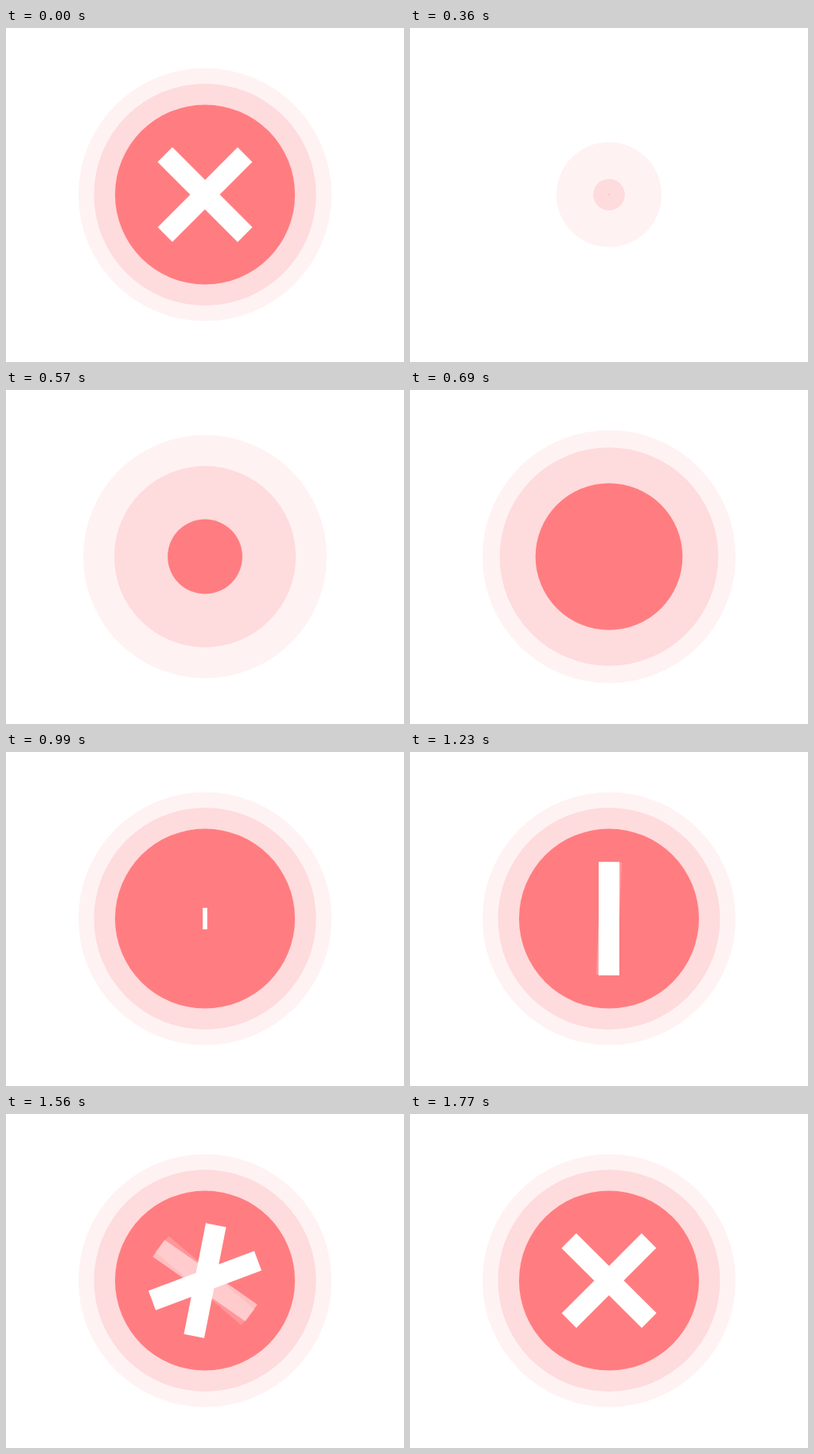
These frames come from a looping animation (500 by 420 pixels, 2250 ms). An HTML page:

```html
<!DOCTYPE html>
<html lang="en">
<head>
<meta charset="utf-8">
<title>Error mark</title>
<style>
  html, body { margin: 0; width: 100%; height: 100%; overflow: hidden; background: #fff; }
  svg { display: block; width: 500px; height: 420px; }
</style>
</head>
<body>
<svg viewBox="0 0 500 420">
  <g id="mark" transform="translate(250 209.5)"></g>
</svg>
<script>
const LOOP = 2250, STEP = 30, REST = 120;
const BAR_W = 26, BAR_H = 142;
const GROW = { start: 904, time: 270 };

const circles = [
  { r: 159, fill: '#fff2f2', start: 118 },
  { r: 139.5, fill: '#fedbdd', start: 208 },
  { r: 113, fill: '#ff7d80', start: 328 }
];
const CIRCLE_TIME = 541;

// Two faint bars run ahead of the solid ones.
const bars = [
  { turn: 135, opacity: 0.2, start: 1180 },
  { turn: 135, opacity: 0.5, start: 1211 },
  { turn: 225, opacity: 1, start: 1247 },
  { turn: 135, opacity: 1, start: 1337 }
];
const TURN_TIME = 450;

const mark = document.getElementById('mark');

function add(name, attrs) {
  const el = document.createElementNS('http://www.w3.org/2000/svg', name);
  for (const key in attrs) el.setAttribute(key, attrs[key]);
  return mark.appendChild(el);
}

for (const c of circles) c.el = add('circle', { fill: c.fill });
for (const b of bars) {
  b.el = add('rect', {
    x: -BAR_W / 2, y: -BAR_H / 2, width: BAR_W, height: BAR_H,
    fill: '#fff', 'fill-opacity': b.opacity
  });
}

// cubic-bezier(.5, 0, .47, 1)
function ease(x) {
  if (x <= 0) return 0;
  if (x >= 1) return 1;
  let lo = 0, hi = 1;
  for (let i = 0; i < 24; i++) {
    const s = (lo + hi) / 2, q = 1 - s;
    if (1.5 * s * q * q + 1.41 * s * s * q + s * s * s < x) lo = s;
    else hi = s;
  }
  return lo * lo * (3 - 2 * lo);
}

const progress = (t, start, time) => ease((t - start) / time);

function draw(now) {
  let t = Math.floor((now % LOOP) / STEP) * STEP;
  if (t < REST) t += LOOP; // finished mark still showing

  for (const c of circles) {
    c.el.setAttribute('r', c.r * progress(t, c.start, CIRCLE_TIME));
  }
  const scale = progress(t, GROW.start, GROW.time);
  for (const b of bars) {
    const angle = b.turn * progress(t, b.start, TURN_TIME);
    b.el.setAttribute('transform', `rotate(${angle}) scale(${scale})`);
    b.el.setAttribute('visibility', scale > 0 ? 'visible' : 'hidden');
  }
}

const began = performance.now();
function tick() {
  draw(performance.now() - began);
  requestAnimationFrame(tick);
}
tick();
</script>
</body>
</html>
```
